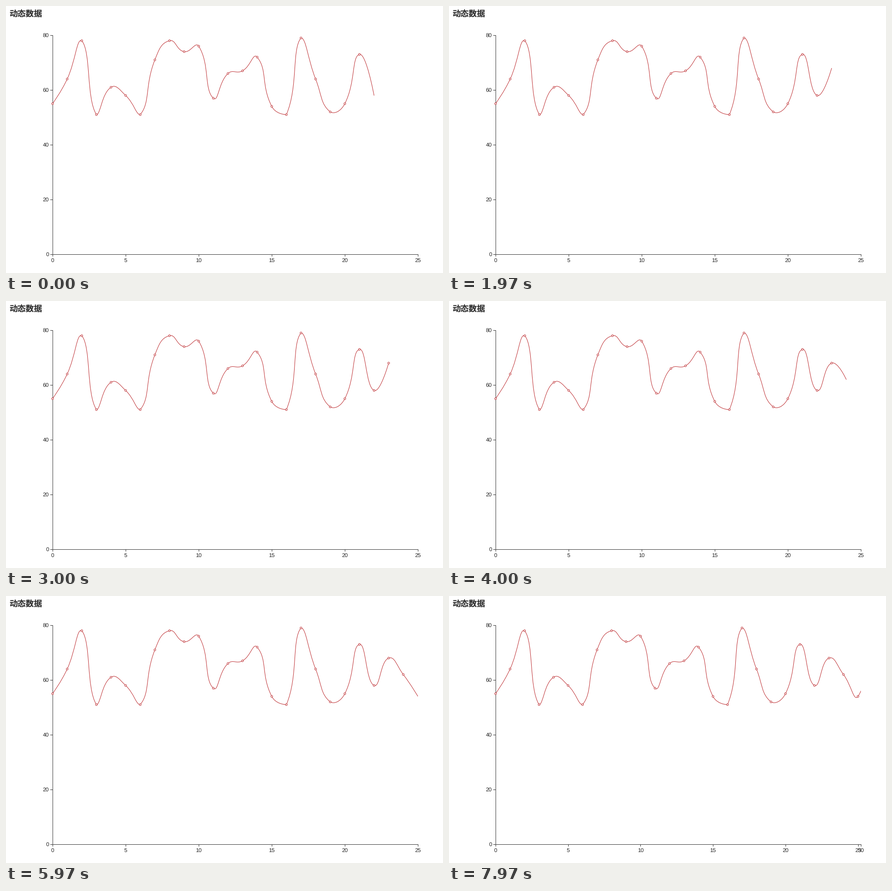
Animation of 957x585 px, one loop 8 s. Source, as a matplotlib script:

```python
import matplotlib.pyplot as plt
import numpy as np
from matplotlib.animation import FuncAnimation
from matplotlib.patches import Circle, PathPatch, Rectangle
from matplotlib.path import Path

W, H, DPI = 957, 585, 64
PT = 72 / DPI  # points per pixel
STEP, LOOP = 20, 8000
LEFT, TOP, PLOT_W, PLOT_H = 102, 64, 800, 480
RIGHT, BOTTOM = LEFT + PLOT_W, TOP + PLOT_H
INK, LABEL, RED = "#333333", "#222222", "#bc2a2e"
VALUES = np.array([55, 64, 78, 51, 61, 58, 51, 71, 78, 74, 76, 57, 66, 67,
                   72, 54, 51, 79, 64, 52, 55, 73, 58, 68, 62, 54, 77])
SMOOTH = 0.5
RADIUS = 2
RESCALE = 0.048  # progress of the axis change from 25 to 30

plt.rcParams["text.hinting"] = "none"
fig = plt.figure(figsize=(W / DPI, H / DPI), dpi=DPI, facecolor="white")
ax = fig.add_axes([0, 0, 1, 1])
ax.set(xlim=(0, W), ylim=(H, 0))
ax.axis("off")


def rule(x0, y0, x1, y1):
    line, = ax.plot([x0, x1], [y0, y1], color=INK, lw=PT, snap=False,
                    solid_capstyle="butt", zorder=1)
    return line


def label(x, y, s, ha):
    return ax.text(x, y, s, ha=ha, va="baseline", color=LABEL, zorder=2,
                   family="Liberation Sans", size=12 * PT)


def smooth_path(pts):
    """Bezier line whose handles follow the chord between neighbours."""
    lo, hi = pts.min(axis=0), pts.max(axis=0)
    verts, handle = [pts[0]], pts[0]
    for i in range(1, len(pts)):
        p = pts[i]
        before = after = p
        if i + 1 < len(pts):
            prev, nxt = pts[i - 1], pts[i + 1]
            d_prev, d_next = np.hypot(*(p - prev)), np.hypot(*(nxt - p))
            ratio = d_next / (d_prev + d_next)
            before = p - (nxt - prev) * SMOOTH * (1 - ratio)
            after = p + (nxt - prev) * SMOOTH * ratio
        verts += [np.clip(handle, lo, hi), np.clip(before, lo, hi), p]
        handle = after
    return Path(verts, [Path.MOVETO] + [Path.CURVE4] * (len(verts) - 1))


ax.text(7, 23, "动态数据", ha="left", va="baseline", color=INK,
        family="Noto Sans CJK JP", weight="bold", size=18 * PT)

rule(LEFT + .5, TOP, LEFT + .5, BOTTOM + 1)
rule(LEFT, BOTTOM + .5, RIGHT + 1, BOTTOM + .5)
for v in range(0, 81, 20):
    y = BOTTOM - v * PLOT_H / 80
    rule(LEFT - 5, y + .5, LEFT, y + .5)
    label(LEFT - 8, y + 4, str(v), "right")

x_ticks = [(v, rule(0, BOTTOM, 0, BOTTOM + 5), label(0, BOTTOM + 17, str(v), "center"))
           for v in range(0, 31, 5)]

curve = PathPatch(Path([(0, 0), (1, 1)]), fill=False, edgecolor=RED, lw=PT,
                  capstyle="butt", joinstyle="bevel", zorder=3)
ax.add_patch(curve)
curve.set_clip_path(Rectangle((LEFT, TOP), PLOT_W, PLOT_H, transform=ax.transData))

dots = [ax.add_patch(Circle((0, 0), RADIUS, facecolor="white", edgecolor=RED,
                            lw=PT, zorder=4, clip_on=False)) for _ in VALUES]


def draw(i):
    t = i * STEP + STEP / 2
    count = 23 + int((t + 30) // 2000)
    grow = np.clip((t + 20) % 2000 / 1000, 0, 1) if (t + 30) % 2000 >= 10 else 0
    wide = count > 26
    unit = PLOT_W / 25
    if wide:
        unit += (PLOT_W / 30 - unit) * RESCALE

    for v, tick, text in x_ticks:
        x = min(LEFT + v * unit, RIGHT)
        tick.set_xdata([round(x) + .5] * 2)
        text.set_x(x)
        for part in (tick, text):
            part.set_visible(v < 30 or wide)

    pts = np.column_stack([LEFT + np.arange(count) * unit,
                           BOTTOM - VALUES[:count] * PLOT_H / 80])
    curve.set_path(smooth_path(pts))
    for k, dot in enumerate(dots):
        scale = 1 if k < count - 1 else grow
        shown = k < count and pts[k, 0] <= RIGHT + .01 and scale > 0
        dot.set_visible(bool(shown))
        if shown:
            dot.center = tuple(pts[k])
            dot.set_radius(RADIUS * scale)
    return [curve, *dots]


anim = FuncAnimation(fig, draw, frames=LOOP // STEP, interval=STEP,
                     repeat=True, repeat_delay=0, blit=False)
plt.show()
```
